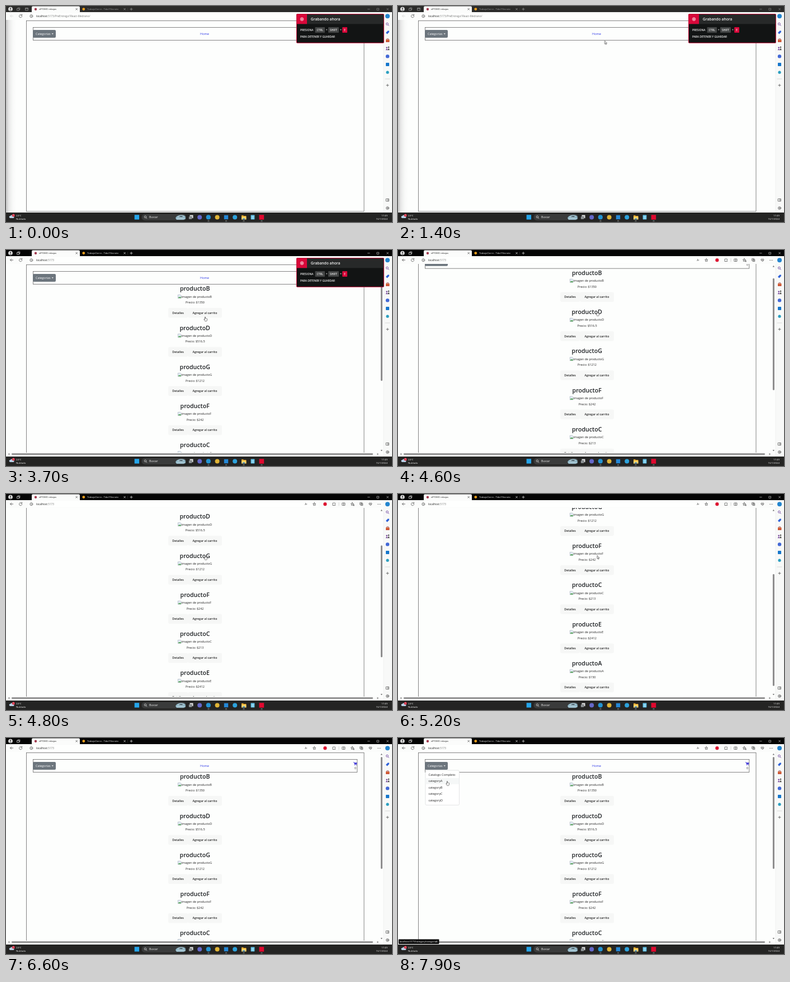
An HTML page for the animation above (8000 ms loop, 690 by 388 pixels).

```html
<!DOCTYPE html>
<html lang="es">
<head>
<meta charset="utf-8">
<title>Catalogo</title>
<style>
@property --s { syntax: "<number>"; inherits: true; initial-value: 0; }
html, body { margin: 0; width: 100%; height: 100%; overflow: hidden; background: #fdfefd; }
svg { display: block; width: 100vw; height: 100vh; animation: scroll 8s linear infinite; }
text { font: 5.4px "Open Sans", "Noto Sans", sans-serif; fill: #222; white-space: pre; }
.mid { text-anchor: middle; }
.end { text-anchor: end; }
.semi { font-weight: 600; font-size: 5.25px; }
.title { font-weight: 600; font-size: 10.6px; fill: #1c1f22; }
.tab { font-size: 4.15px; }
.url { font-size: 4.75px; }
.task { font-size: 4.35px; fill: #f2f2f2; }
.toast text { font-size: 4.75px; font-weight: 600; fill: #f4f4f4; }
.line { fill: none; stroke: #666; stroke-width: .8; }
.thin { fill: none; stroke: #444; stroke-width: .7; stroke-linecap: round; stroke-linejoin: round; }
.cc { stroke: currentColor; }

.page { transform: translateY(calc(var(--s) * -1px)); }
.thumb { transform: translateY(calc(var(--s) * .588px)); }
.cursor { animation: move 8s linear infinite; }

.frameTone, .backTone, .before, .blank, .list, .toast, .link, .link2,
.menu, .hover, .seen, .arrow, .hand { animation: 8s step-end infinite; }
.frameTone { animation-name: frameTone; }
.backTone { animation-name: backTone; }
.before { animation-name: before; }
.blank { animation-name: blank; }
.list { animation-name: list; }
.toast { animation-name: toast; }
.link { animation-name: link; }
.link2 { animation-name: link2; }
.menu { animation-name: menu; }
.hover { animation-name: hover; }
.seen { animation-name: seen; }
.arrow { animation-name: arrow; }
.hand { animation-name: hand; }

@keyframes frameTone { 0% { color: #a0a0a0; } 28.75%, 100% { color: #f0f0f0; } }
@keyframes backTone { 0% { color: #d4d4d4; } 28.75%, 100% { color: #333; } }
@keyframes before { 0% { opacity: 1; } 28.75%, 100% { opacity: 0; } }
@keyframes blank { 0% { opacity: 1; } 36.25%, 100% { opacity: 0; } }
@keyframes list { 0% { opacity: 0; } 36.25%, 100% { opacity: 1; } }
@keyframes toast { 0% { opacity: 1; } 57.5%, 100% { opacity: 0; } }
@keyframes link { 0% { opacity: 0; } 23.7% { opacity: 1; } 35%, 100% { opacity: 0; } }
@keyframes link2 { 0% { opacity: 0; } 98.7%, 100% { opacity: 1; } }
@keyframes menu { 0% { opacity: 0; } 91.2%, 100% { opacity: 1; } }
@keyframes hover { 0% { opacity: 0; } 95.5%, 100% { opacity: 1; } }
@keyframes seen { 0% { opacity: 0; } 3.7%, 100% { opacity: 1; } }
@keyframes hand { 0% { opacity: 0; } 21.9% { opacity: 1; } 30% { opacity: 0; } 36.25% { opacity: 1; }
  62.5% { opacity: 0; } 86.9%, 100% { opacity: 1; } }
@keyframes arrow { 0% { opacity: 1; } 21.9% { opacity: 0; } 30% { opacity: 1; } 36.25% { opacity: 0; }
  62.5% { opacity: 1; } 86.9%, 100% { opacity: 0; } }
@keyframes scroll {
  0%, 56.25% { --s: 0; } 57.5% { --s: 28; } 60% { --s: 99; } 62.5% { --s: 148; } 66.25%, 70% { --s: 206; }
  71.25% { --s: 197; } 76.25% { --s: 129; } 78.75% { --s: 62; } 81.25%, 100% { --s: 0; }
}
@keyframes move {
  0%, 3.75% { transform: translate(16px, 370px); }
  8.75% { transform: translate(172px, 122px); }
  11.25% { transform: translate(160px, 121px); }
  12.5% { transform: translate(260px, 75px); }
  13.75% { transform: translate(450px, 32px); }
  15% { transform: translate(526px, 22px); }
  16.25% { transform: translate(450px, 42px); }
  17.5% { transform: translate(369.5px, 62.5px); }
  21.25% { transform: translate(358px, 52px); }
  25%, 28.75% { transform: translate(355.5px, 49px); }
  32.5%, 50% { transform: translate(356px, 120px); }
  55%, 71.25% { transform: translate(356px, 110.5px); }
  76.25%, 82.5% { transform: translate(352.5px, 138px); }
  88.75% { transform: translate(80px, 48px); }
  92.5% { transform: translate(86px, 47px); }
  96.25%, 100% { transform: translate(88px, 77.5px); }
}
</style>
</head>
<body>
<svg viewBox="0 0 690 388" xmlns="http://www.w3.org/2000/svg">
  <defs>
    <clipPath id="view"><path d="M0 25H675V371H0Z"/></clipPath>
    <clipPath id="short"><path d="M0 25H669V364H0Z"/></clipPath>
    <linearGradient id="shade">
      <stop offset="0" stop-color="#c4c4c4"/><stop offset=".25" stop-color="#e6e6e6"/>
      <stop offset="1" stop-color="#fdfefd" stop-opacity="0"/>
    </linearGradient>
  </defs>
  <rect width="690" height="388" fill="#fdfefd"/>
  <rect class="before" y="11" width="19" height="360" fill="url(#shade)"/>

  <!-- page -->
  <g clip-path="url(#view)">
    <rect class="line blank" x="36.5" y="26.5" width="603.5" height="342.5"/>
    <g class="list" clip-path="url(#short)">
      <g class="page">
        <rect class="line" x="36.5" y="26.5" width="603.5" height="541"/>
        <g id="products"></g>
      </g>
    </g>
    <g class="page">
      <rect class="line" x="48.5" y="38.5" width="579.3" height="23"/>
      <rect x="48" y="43" width="41" height="14" rx="2" fill="#6c757d"/>
      <text x="53" y="52" style="fill:#fff">Categorias</text>
      <path d="M81.6 49.2h3.2l-1.6 1.7z" fill="#fff"/>
      <text class="mid" x="355" y="52" style="fill:#2b36e6;font-size:5.6px">Home</text>
      <path d="M621 43.6h1.2l.9 3.6h3.4l.8-2.7h-4.6z" fill="#4038d8" stroke="#4038d8" stroke-width=".5"/>
      <circle cx="623.4" cy="48.4" r=".7" fill="#4038d8"/><circle cx="626.2" cy="48.4" r=".7" fill="#4038d8"/>
      <text class="mid" x="624.5" y="56.3" style="font-size:5px">0</text>
      <g class="menu">
        <rect x="49" y="58" width="60.5" height="62.5" rx="2" fill="#fff" stroke="#d2d4d5" stroke-width=".6"/>
        <rect class="hover" x="49.3" y="72" width="59.9" height="11" fill="#f5f7f7"/>
        <g id="items"></g>
      </g>
    </g>
  </g>

  <!-- scrollbars -->
  <g class="list">
    <rect x="0" y="364" width="669" height="7" fill="#fbfcfb"/>
    <path d="M6.3 365l-2.6 1.6 2.6 1.6zM663.5 365l2.6 1.6-2.6 1.6zM669.6 30.4l1.7-2.6 1.7 2.6zM669.6 359l1.7 2.6 1.7-2.6z" fill="#777"/>
    <rect x="10" y="365.3" width="646" height="2.6" rx="1.3" fill="#8b8b8b"/>
    <rect class="thumb" x="669.9" y="34" width="3" height="201" rx="1.5" fill="#8b8b8b"/>
  </g>

  <!-- browser bars -->
  <rect y="11" width="690" height="14" fill="#fbfcfb"/>
  <rect x="39" y="12.5" width="520" height="11.5" rx="3" fill="#fefffe"/>
  <rect x="675" y="11" width="15" height="360" fill="#f8f9f8"/>
  <path d="M675 25V371" stroke="#e9e9e9" stroke-width=".6"/>
  <rect width="690" height="11" fill="#050505"/>
  <rect class="before" width="690" height="11" fill="#2b2b2a"/>
  <path d="M46 11V2.5q0-2 2-2h82q2 0 2 2V11z" fill="#fbfcfb"/>
  <circle cx="8" cy="5.5" r="3.8" fill="#e9e9e9"/>
  <circle cx="8" cy="4.4" r="1.3" fill="#555"/><path d="M5.6 8.2q2.4-3.4 4.8 0z" fill="#555"/>
  <circle cx="53" cy="5.7" r="2.2" fill="#a23c50"/>
  <text class="tab" x="59" y="7.2">elPOMO rebajas</text>
  <path class="thin" d="M124.8 4.3l2.8 2.8m0-2.8l-2.8 2.8"/>
  <circle cx="138.8" cy="5.6" r="2.4" fill="#f5a11c"/>
  <g class="frameTone">
    <text class="tab" x="145" y="7.2" style="fill:currentColor">TrabajoCierre - Tidal Filecrate</text>
    <path class="thin cc" d="M210.7 4.3l2.8 2.8m0-2.8l-2.8 2.8M224 3.6v4.2m-2.1-2.1h4.2M20 4.4h3.4v3.6H20zM21.2 4.4V3.2h3.6v3.6h-1.4"/>
    <path class="thin cc" stroke-opacity=".8" d="M646.6 5.7h3.6M663.3 4.2h3.2v3.2h-3.2zM680.6 4.1l3.1 3.1m0-3.1l-3.1 3.1"/>
  </g>
  <path class="thin" d="M217.5 3.5v4.4" stroke-opacity=".7"/>
  <g class="before"><path class="thin" d="M35 3.4h4.4v4.4H35zM35 4.6h4.4" style="stroke:#aaa"/></g>
  <g class="backTone"><path class="thin cc" d="M12.7 18H7.6l2.1-2.1M7.6 18l2.1 2.1"/></g>
  <path class="thin" d="M28.2 16.6a2.6 2.6 0 1 0 .5 1.9M28.6 15v1.9h-1.9"/>
  <circle class="thin" cx="45.3" cy="18.2" r="2.5"/><path class="thin" d="M45.3 18v1.3M45.3 16.9v.1"/>
  <text class="url" x="54" y="19.9">localhost<tspan fill="#777">:5173</tspan></text>
  <text class="url before" x="86" y="19.9" style="fill:#777">/PreEntrega1React-Medrano/</text>
  <text x="534.2" y="19.6" style="font-size:4.4px">A<tspan dy="-1" style="font-size:3px">»</tspan></text>
  <g id="stars"></g>
  <circle cx="570.4" cy="18.2" r="3.1" fill="#dd1631"/>
  <path class="thin" d="M584.4 16.2h1.3a.9.9 0 0 1 1.6 0h1.2v1.3a.9.9 0 0 0 0 1.7v1.3h-4.1zM601.2 16.1h4.8v4.2h-4.8zM603.6 16.1v4.2M633 15.6h3.6v3.6H633zM634.2 20.6h3.6V17M635 16.5v1.8m-.9-.9h1.8"/>
  <path class="thin" d="M595 15.5v5.4" stroke-opacity=".3"/>
  <path class="thin" d="M651.4 20.6l-2.3-2.4a1.4 1.4 0 0 1 2.3-1.6 1.4 1.4 0 0 1 2.3 1.6zM649.7 18.2h1l.6-.9.8 1.6.5-.7h.8"/>
  <path d="M664.7 18.2h.1M667 18.2h.1M669.3 18.2h.1" stroke="#333" stroke-width="1.1" stroke-linecap="round"/>

  <!-- side rail -->
  <circle cx="682" cy="18.2" r="4" fill="#2385cf"/>
  <circle cx="681.4" cy="32.2" r="1.9" fill="none" stroke="#6a3f9c" stroke-width=".9"/><path d="M682.8 33.7l1.8 1.8" stroke="#6a3f9c" stroke-width="1"/>
  <path d="M679 48.1l3.4-3.6h2.5v2.4l-3.5 3.6z" fill="#2f62d9"/>
  <path d="M679 60.2h6.4v4.6H679z" fill="#c6412c"/><path d="M680.8 60v-1.3h2.8V60" fill="none" stroke="#833" stroke-width=".7"/><path d="M679 62h6.4" stroke="#f0b445" stroke-width=".7"/>
  <circle cx="680.7" cy="74.8" r="1.4" fill="#7a4b9d"/><path d="M678.6 79.3q2.1-5 4.2 0z" fill="#7a4b9d"/><circle cx="684" cy="74" r="1.2" fill="#444"/><path d="M682.4 79.3q1.6-6.5 3.2 0z" fill="#444"/>
  <circle cx="682" cy="90.4" r="3.2" fill="#4268d6"/>
  <rect x="679" y="102" width="6" height="6" rx=".7" fill="#1677cc"/>
  <circle cx="682" cy="119.2" r="2.6" fill="#2a9fc0"/>
  <path d="M677.5 131h9" stroke="#ccc" stroke-width=".7"/>
  <path class="thin" d="M682 140.3v4.2m-2.1-2.1h4.2M679.6 346.4h4.8v4.2h-4.8zM682.7 346.4v4.2"/>
  <circle class="thin" cx="682" cy="363" r="2.5"/><circle class="thin" cx="682" cy="363" r=".9"/>

  <!-- link hints -->
  <g class="link"><rect x="1" y="361.5" width="32" height="8.5" rx="1" fill="#0c0c0c"/><text x="2.7" y="367.3" style="font-size:4.3px;fill:#fff">localhost:5173</text></g>
  <g class="link2"><rect x="1" y="361.5" width="72.5" height="8.5" rx="1" fill="#0c0c0c"/><text x="2.7" y="367.3" style="font-size:4.15px;fill:#fff">localhost:5173/category/categoriaA</text></g>

  <!-- recording notice -->
  <g class="toast">
    <rect x="519.5" y="14.5" width="155.8" height="51.8" rx=".8" fill="#121414" stroke="#c20b36"/>
    <rect x="520" y="15" width="154.8" height="17.3" fill="#272929"/>
    <rect x="520" y="15" width="18" height="17.3" fill="#d8083a"/>
    <circle cx="529" cy="23.6" r="2.7" fill="none" stroke="#fff" stroke-width=".9"/><circle cx="529" cy="23.6" r="1.2" fill="#fff"/>
    <text x="544.8" y="26.2" style="font-size:6.7px">Grabando ahora</text>
    <text x="526" y="44.8">PRESIONA</text>
    <rect x="552.5" y="38" width="17.5" height="10" rx=".8" fill="#434545"/>
    <rect x="576" y="38" width="19" height="10" rx=".8" fill="#434545"/>
    <rect x="601.2" y="38" width="8.8" height="10" rx=".8" fill="#d8083a"/>
    <text class="mid" x="561.2" y="44.8">CTRL</text><text class="mid" x="573" y="44.8">+</text>
    <text class="mid" x="585.5" y="44.8">SHIFT</text><text class="mid" x="598.3" y="44.8">+</text>
    <text class="mid" x="605.6" y="44.8">E</text>
    <text x="526" y="57.4">PARA DETENER Y GUARDAR</text>
  </g>

  <!-- taskbar -->
  <rect y="371" width="690" height="17" fill="#242423"/>
  <path d="M7.5 381a2 2 0 0 1 .3-4 2.8 2.8 0 0 1 5.2.4 1.9 1.9 0 0 1 .5 3.6z" fill="#b9cfe4"/>
  <circle cx="13.3" cy="376" r="2.5" fill="#d8344a"/><text class="mid" x="13.3" y="377.2" style="font-size:3.3px;fill:#fff">1</text>
  <text class="task" x="18" y="378.2">24°C</text><text class="task" x="18" y="383.8">Nublado</text>
  <rect x="229.7" y="375.2" width="8.4" height="8.4" fill="#25a5ea"/>
  <rect x="242.5" y="373.8" width="79.5" height="11.4" rx="5.7" fill="#3a3b3b"/>
  <circle cx="249" cy="378.8" r="1.8" fill="none" stroke="#eee" stroke-width=".7"/><path d="M250.3 380.2l1.7 1.7" stroke="#eee" stroke-width=".8"/>
  <text class="task" x="256" y="381.4" style="font-size:4.9px">Buscar</text>
  <path d="M303 381q2-5 9-5.5 7-.5 8.5 2.5l.5 4.5-3.5 1.5H305z" fill="#8fb6c6"/><path d="M307 379l5-2.2 5 .4-2 2.6zM304.5 382h15" fill="#38505c" stroke="#e2eff2" stroke-width=".6"/>
  <rect x="328.5" y="375.6" width="6" height="5.6" fill="#e4e6e7"/><rect x="326.8" y="378" width="5.4" height="5" fill="#8c9295" stroke="#242423" stroke-width=".4"/>
  <circle cx="346.2" cy="379.4" r="4" fill="#6568c9"/>
  <circle cx="361.8" cy="379.4" r="4.1" fill="#2394d2"/>
  <circle cx="377.6" cy="379.4" r="4" fill="#e0b436"/>
  <rect x="389.8" y="375.8" width="7.4" height="7.4" fill="#2588d6"/>
  <circle cx="409.2" cy="379.4" r="4" fill="#2da2dc"/>
  <path d="M421 376h3l1 1h4.4v6.4H421z" fill="#e7a72d"/><path d="M421 378.5h8.4v4.9H421z" fill="#fbd668"/><path d="M423 381.6h4.4v1.8H423z" fill="#2d83cf"/>
  <rect x="437.6" y="375.4" width="6.8" height="8.2" rx=".8" fill="#5fc0e6"/><path d="M439 378h4M439 379.8h4M439 381.6h4" stroke="#e8f6fc" stroke-width=".6"/>
  <rect x="452.6" y="375.2" width="8.6" height="8.6" fill="#e0092f"/>
  <g id="marks"></g>
  <text class="task end" x="682" y="378.2">17:49</text><text class="task end" x="682" y="383.8">16/1/2024</text>

  <!-- pointer -->
  <g class="seen">
    <g class="cursor" fill="#fff" stroke="#111" stroke-width=".55" stroke-linejoin="round">
      <path class="arrow" d="M0 0V5.8L1.3 4.6 2.2 6.7 3.1 6.3 2.3 4.3H4.1Z"/>
      <path class="hand" d="M-.6.5Q0-.3.6.5V2.8Q1.2 2.2 1.6 3 2.2 2.5 2.6 3.3 3.4 2.9 3.5 3.8V5.6Q3.3 7.4 2.6 7.8H-.2Q-1 6.6-2.1 4.9-2.2 3.8-1.2 4.2L-.6 4.8Z"/>
    </g>
  </g>
</svg>
<script>
const fill = (id, html) => { document.getElementById(id).innerHTML = html; };

const product = ([name, price], i) => `
  <g transform="translate(0 ${i * 70.25})">
    <text class="title mid" x="337.7" y="73.3">producto${name}</text>
    <path d="M307.3 80.6h4.2l1.6 1.6v4.4h-5.8z" fill="#e6eef8" stroke="#8a96a5" stroke-width=".5"/>
    <path d="M307.6 86.3l2-2.6 1.4 1.3 1.8-1.4v2.7z" fill="#4ea04f"/>
    <text x="313.6" y="85.6">imagen de producto${name}</text>
    <text class="mid" x="338" y="96.2">Precio: $${price}</text>
    <rect x="290" y="104" width="35.3" height="17.5" rx="2.8" fill="#f6f7f6"/>
    <rect x="325" y="104" width="61" height="17.5" rx="2.8" fill="#f6f7f6"/>
    <text class="semi mid" x="307.6" y="114.7">Detalles</text>
    <text class="semi mid" x="355.4" y="114.7">Agregar al carrito</text>
  </g>`;
const goods = [["B", 1350], ["D", 516.5], ["G", 1212], ["F", 242], ["C", 213], ["E", 2412], ["A", 150]];
fill("products", goods.map(product).join(""));

const items = ["Catalogo Completo", "categoryA", "categoryB", "categoryC", "categoryD"];
fill("items", items.map((t, i) => `<text x="54.5" y="${67.9 + i * 11.5}">${t}</text>`).join(""));

const star = (x, y) => {
  const pts = [...Array(10).keys()].map(k => {
    const r = k % 2 ? 1.25 : 2.8, a = k * Math.PI / 5;
    return `${x + r * Math.sin(a)},${y - r * Math.cos(a)}`;
  });
  return `<polygon class="thin" points="${pts.join(" ")}"/>`;
};
fill("stars", star(551.2, 18.4) + star(619, 18.2) + '<path class="thin" d="M620.6 19.4h2M620.6 20.8h2"/>');

fill("marks", [362, 393.5, 425, 457].map(x =>
  `<rect x="${x - 1.6}" y="385.6" width="3.2" height="1" rx=".5" fill="#9aa3a8"/>`).join(""));
</script>
</body>
</html>
```
